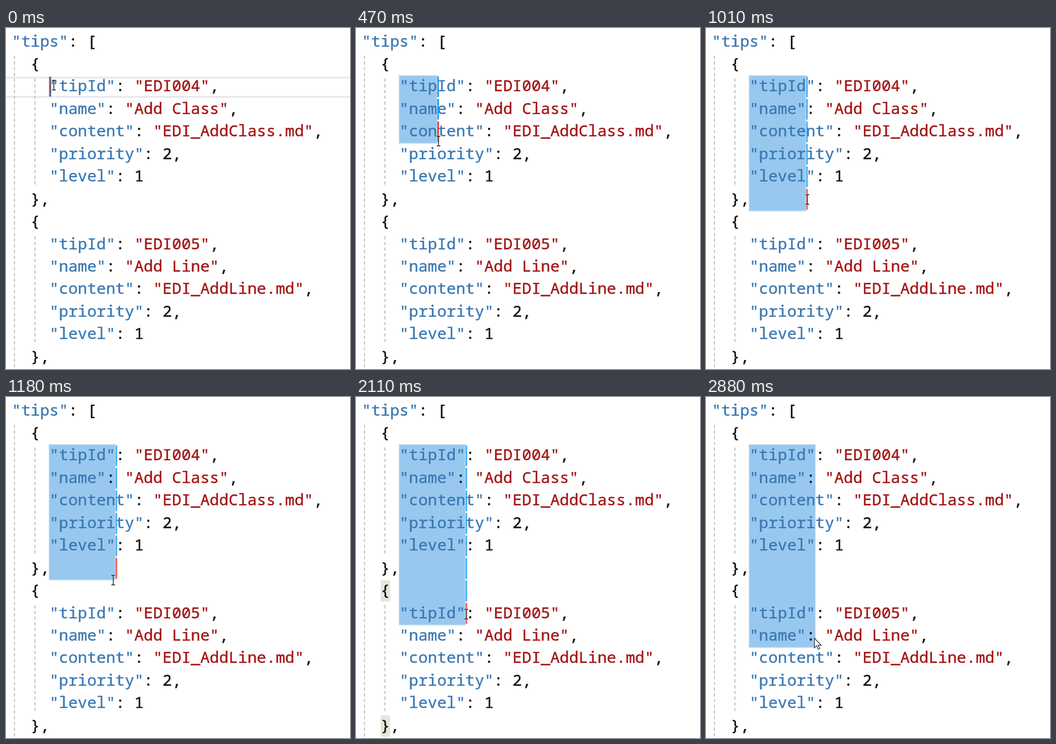
These frames come from a looping animation (571 px wide and 567 px high, 2970 ms). An HTML page:

```html
<!DOCTYPE html>
<html lang="en">
<head>
<meta charset="utf-8">
<title>Box selection in a JSON file</title>
<style>
html, body { margin: 0; width: 100%; height: 100%; overflow: hidden; background: #fff; }
svg { display: block; }
text {
  font: 26.08px "Noto Sans Mono", "DejaVu Sans Mono", monospace; white-space: pre;
  fill: currentColor; stroke: currentColor; stroke-width: .4px; color: #111;
}
.key { color: #3a78b2; }
.str { color: #a31515; }
tspan { fill: currentColor; stroke: currentColor; }
.guide { stroke: #c9c9c9; stroke-width: 2; stroke-dasharray: 5.5 4; }
</style>
</head>
<body>
<svg width="571" height="567" viewBox="0 0 571 567">
  <g id="under"></g>
  <path class="guide" d="M14 46V567M48 84V263M48 346V525"/>
  <g id="select"></g>
  <g id="code"></g>
  <g id="over"></g>
</svg>
<script>
const LOOP = 2970, STEP = 77.8;
const CHAR = 15.65, LINE = 37.45, LEFT = 72, TOP = 79;
const $ = id => document.getElementById(id);
const rect = (x, y, w, h, fill, more = '') =>
  `<rect x="${x}" y="${y}" width="${w}" height="${h}" fill="${fill}" ${more}/>`;

const tip = (id, name, file) => `  {
    "tipId": "${id}",
    "name": "${name}",
    "content": "${file}",
    "priority": 2,
    "level": 1
  },`;
const source = ['"tips": [',
  tip('EDI004', 'Add Class', 'EDI_AddClass.md'),
  tip('EDI005', 'Add Line', 'EDI_AddLine.md')].join('\n');

$('code').innerHTML = source.split('\n').map((line, i) => {
  const spans = line.replace(/"[^"]*"(?=(:?))/g, (word, colon) =>
    `<tspan class='${colon ? 'key' : 'str'}'>${word}</tspan>`);
  return `<text x="9.5" y="${30.5 + LINE * i}" xml:space="preserve">${spans}</text>`;
}).join('');

// pointer path: step, x, y
const path = [
  [0, 79.5, 95], [1, 86, 98], [6, 137, 188], [7, 147, 222], [9, 154, 227],
  [10, 157, 247], [14, 172, 298], [15, 178, 304.5], [19, 183, 337], [22, 183, 337],
  [23, 183, 345], [27, 183, 361], [29, 183, 381], [33, 180, 405], [38, 180, 405]
];

function pointer(k) {
  const i = Math.max(1, path.findIndex(p => p[0] >= k));
  const [a, b] = [path[i - 1], path[i]];
  const f = (k - a[0]) / (b[0] - a[0]);
  return [a[1] + (b[1] - a[1]) * f, a[2] + (b[2] - a[2]) * f];
}

const beam = (x, y) => {
  const d = 'M-3 -8H-1L0 -7L1 -8H3M0 -7V7M-3 8H-1L0 7L1 8H3';
  return `<g transform="translate(${x} ${y})" fill="none">
    <path d="${d}" stroke="#fff" stroke-width="3" opacity=".5"/>
    <path d="${d}" stroke="#222" stroke-width="1.3"/></g>`;
};
const arrow = `<path d="M180 401V417L183.7 413.6L186.3 419.5L188.9 418.3L186.3 412.7H191Z"
  fill="#fff" stroke="#333" stroke-width="1.2"/>`;

function draw(k) {
  const [x, y] = pointer(k);
  let under = '', select = '', over = '';
  if (k === 0) {
    under = rect(0, 81, 571, 3, '#e8e8f1') + rect(0, 113, 571, 3, '#e8e8f1');
    over = rect(71.5, 81, 3.5, 33, '#7d5f7d');
  } else {
    // the selected rows trail the pointer by one step
    const rows = Math.floor((pointer(k - 1)[1] - TOP) / LINE) + 1;
    const width = Math.round((x - LEFT) / CHAR) * CHAR;
    const height = rows * LINE;
    select = rect(LEFT - .5, TOP, width + .5, height + .5, '#99c8ef',
      'stroke="#c4e0f6" stroke-width="1.2"');
    if (k < 37) {
      const solid = k < 8 ? 1 : .8;
      for (let i = 0; i < rows; i++)
        over += rect(LEFT + width + .4, TOP + i * LINE + 1.5, 2.6, LINE - 3,
          i === rows - 1 ? '#f0322f' : '#1c9cf0', `opacity="${solid}"`);
    }
  }
  if (k >= 26 && k < 35)
    for (const row of [6, 12])
      under += rect(41, TOP + row * LINE + 1, 15.5, LINE - 2, '#e3e7d8');
  $('under').innerHTML = under;
  $('select').innerHTML = select;
  $('over').innerHTML = over + (k < 37 ? beam(x, y) : arrow);
}

const start = performance.now();
let shown = -1;
function frame() {
  const t = (performance.now() - start) % LOOP;
  const k = Math.min(37, Math.floor((t + 6) / STEP));
  if (k !== shown) draw(shown = k);
  requestAnimationFrame(frame);
}
frame();
</script>
</body>
</html>
```
